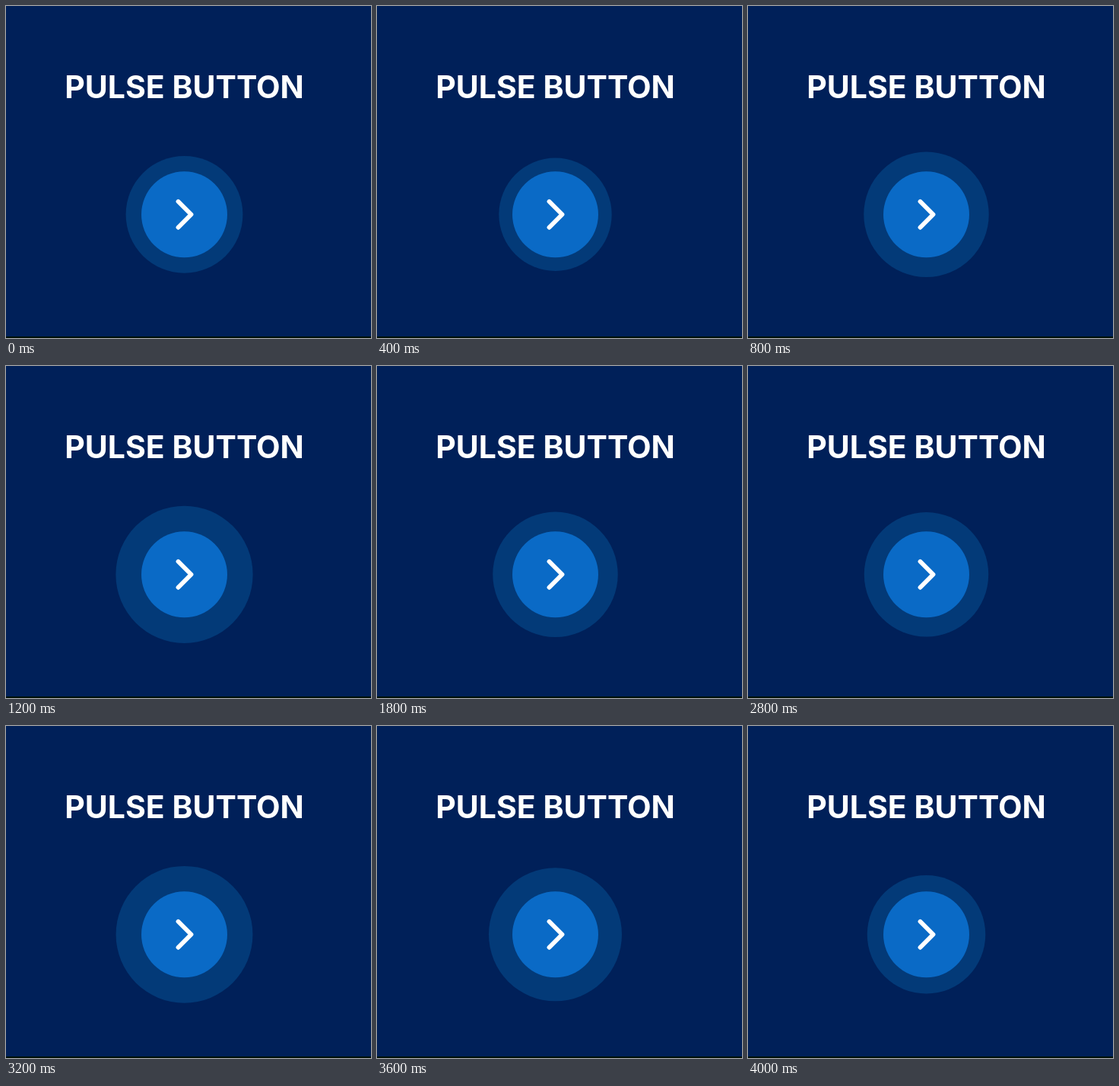
An HTML page for the animation above (4100 ms loop, 480 px wide and 436 px high).

```html
<!DOCTYPE html>
<html lang="en">
<head>
<meta charset="utf-8">
<title>Pulse button</title>
<style>
  html, body { margin: 0; width: 100%; height: 100%; overflow: hidden; background: #002059; }
  svg { display: block; }
  text { font: 700 41px Inter, sans-serif; fill: #fff; text-anchor: middle; }
</style>
</head>
<body>
<svg width="480" height="436" viewBox="0 0 480 436">
  <rect y="434" width="480" height="2" fill="#001008"/>
  <text x="234.5" y="121">PULSE BUTTON</text>
  <g transform="translate(234.5 273.8)">
    <circle id="ring" fill="#033a78"/>
    <circle r="56.5" fill="#0a6ac6"/>
    <path d="M-8 -17L9 0L-8 17" fill="none" stroke="#fff" stroke-width="5.8" stroke-linecap="round" stroke-linejoin="round"/>
  </g>
</svg>
<script>
  const LOOP = 4100, STEP = 100, PERIOD = 2020, PEAK = 1300;
  const ring = document.getElementById('ring');

  function draw(now) {
    const time = Math.floor((now % LOOP) / STEP) * STEP;
    const wave = Math.cos((time - PEAK) / PERIOD * 2 * Math.PI);
    ring.setAttribute('r', 82.1 + 8.4 * wave);
  }

  const start = performance.now();
  function tick() {
    draw(performance.now() - start);
    requestAnimationFrame(tick);
  }
  tick();
</script>
</body>
</html>
```
